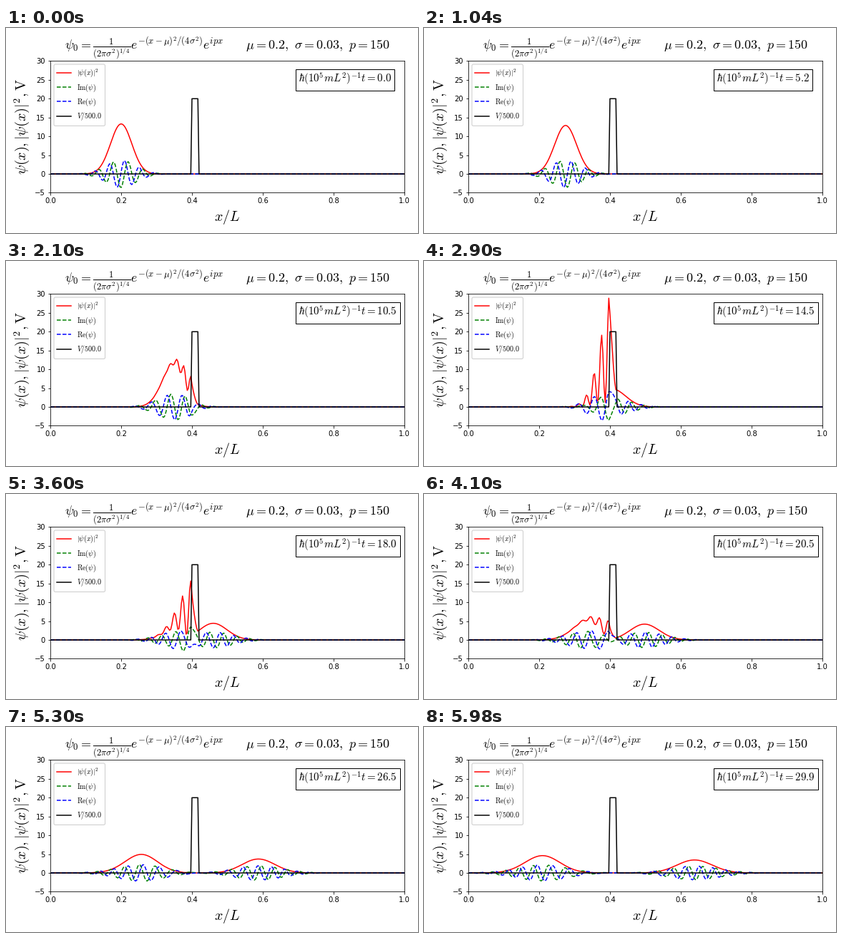
Write a matplotlib script that moves like this. It is 576 by 288 pixels and loops after 6 s.

```python
import numpy as np
import matplotlib.pyplot as plt
from matplotlib.animation import FuncAnimation
from matplotlib.patches import FancyBboxPatch, Rectangle

plt.rcParams["mathtext.fontset"] = "cm"

W, H, DPI = 576, 288, 72
FRAMES, INTERVAL = 300, 20
LEFT, RIGHT, TOP, BOTTOM = 62, 557, 46.45, 231.45

# Gaussian wave packet and square barrier on a grid with fixed ends
NX = 301
MU, SIGMA, P = 0.2, 0.03, 150
V0, V_SCALE = 1e4, 500.0
DT = 1e-5
x = np.linspace(0, 1, NX)
dx = x[1] - x[0]
V = np.zeros(NX)
V[120:126] = V0


def evolve():
    """Wave function at every time step, from the eigenstates of H."""
    psi0 = np.exp(-(x - MU) ** 2 / (4 * SIGMA**2) + 1j * P * x)
    psi0 /= (2 * np.pi * SIGMA**2) ** 0.25
    hop = np.full(NX - 3, -0.5 / dx**2)
    ham = np.diag(1 / dx**2 + V[1:-1]) + np.diag(hop, 1) + np.diag(hop, -1)
    energy, states = np.linalg.eigh(ham)
    coef = states.T @ psi0[1:-1]
    times = np.arange(FRAMES) * DT
    psi = np.zeros((NX, FRAMES), complex)
    psi[1:-1] = states @ (coef[:, None] * np.exp(-1j * np.outer(energy, times)))
    return psi.T


psi = evolve()

fig = plt.figure(figsize=(W / DPI, H / DPI), dpi=DPI, facecolor="white")
ax = fig.add_axes([LEFT / W, 1 - BOTTOM / H, (RIGHT - LEFT) / W, (BOTTOM - TOP) / H])
ax.set_xlim(0, 1)
ax.set_ylim(-5, 30)

styles = [
    (r"$|\psi(x)|^2$", "r", "-"),
    (r"$\mathrm{Im}(\psi)$", "g", "--"),
    (r"$\mathrm{Re}(\psi)$", "b", "--"),
    (rf"$V/{V_SCALE}$", "k", "-"),
]
prob, imag, real, barrier = [
    ax.plot(x, V / V_SCALE, color=c, ls=ls, lw=1.5)[0] for _, c, ls in styles
]

# Overlay in pixels, y pointing down
ov = fig.add_axes([0, 0, 1, 1], zorder=5)
ov.set_xlim(0, W)
ov.set_ylim(H, 0)
ov.axis("off")


def label(px, py, text, size, **kw):
    return ov.text(px, py, text, fontsize=size, va="baseline", **kw)


title = (
    r"$\psi_0=\frac{1}{(2\pi\sigma^2)^{1/4}}"
    r"e^{-(x\hspace{0.2}{-}\hspace{0.2}\mu)^2/(4\sigma^2)}e^{ipx}"
    rf"\qquad\mu={MU},\ \sigma={SIGMA},\ p={P}$"
)
mid_x, mid_y = (LEFT + RIGHT) / 2, (TOP + BOTTOM) / 2
label(mid_x, 30, title, 18, ha="center")
label(mid_x, 271, r"$x/L$", 20, ha="center")
label(28, mid_y, r"$\psi(x),|\psi(x)|^2,\mathrm{V}$", 20, ha="center",
      rotation=90, rotation_mode="anchor")

# Legend
ov.add_patch(FancyBboxPatch(
    (67, 51), 71.5, 86.5, boxstyle="round,pad=0,rounding_size=2",
    facecolor=(1, 1, 1, 0.8), edgecolor="0.8", lw=1))
for i, (text, color, ls) in enumerate(styles):
    y = 62.6 + 20.4 * i
    ov.plot([71, 91], [y, y], color=color, ls=ls, lw=1.5)
    label(99, y + 3.5, text, 10)

# Clock
box = ov.add_patch(Rectangle((405, 58), 138, 30, fill=False, ec="k", lw=1))
clock = label(409, 77, "", 15)


def update(n):
    prob.set_ydata(np.abs(psi[n]) ** 2)
    imag.set_ydata(psi[n].imag)
    real.set_ydata(psi[n].real)
    t = n / 10
    clock.set_text(rf"$\hbar(10^5mL^2)^{{-1}}t={t:.1f}$")
    box.set_width(138 if t < 10 else 146)
    return prob, imag, real, clock, box


anim = FuncAnimation(fig, update, frames=FRAMES, interval=INTERVAL,
                     repeat=True, repeat_delay=0, blit=False)
plt.show()
```
